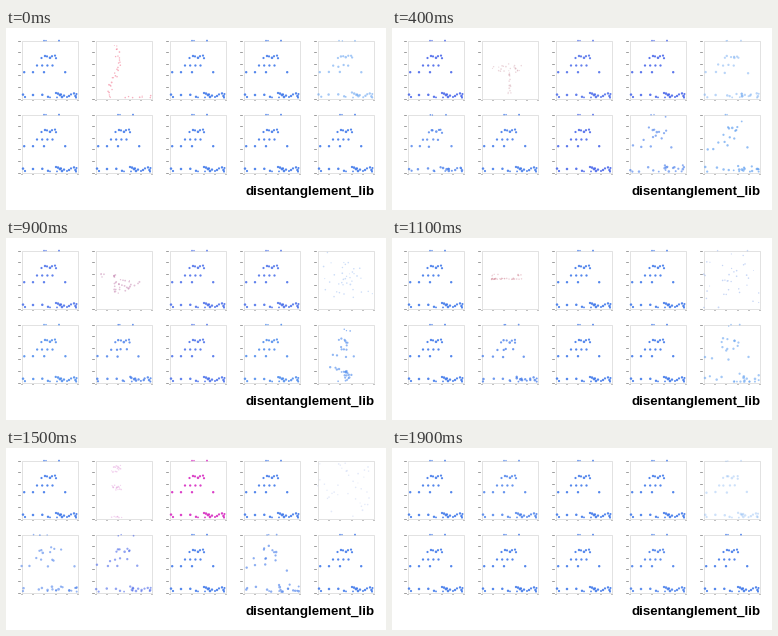
Recreate the animation shown at these times as a matplotlib script. Size 380 px wide and 182 px high, loop 2 s.

```python
import numpy as np
import matplotlib.pyplot as plt
from matplotlib.animation import FuncAnimation
from matplotlib.colors import to_rgb
from matplotlib.patches import Rectangle

W, H, DPI = 380, 182, 100
PX = 72 / DPI
FRAMES, STEP = 20, 100
PW, PH, PITCH = 56, 58, 74
BLUE, INDIGO, PALE = "#4079ea", "#4a68ea", "#5a9cf0"

# Dots of one panel: (x, y, diameter), grouped by band
TOP = [(23, 0.6, 1.6), (25, 0.6, 1.4), (38, 0.6, 1.8)]
ARC = [(20.5, 18, 2.2), (24, 16, 2.4), (26, 16.4, 2.2), (29, 17.8, 2.6),
       (31, 16.2, 2.2), (34, 15.6, 2.2), (35, 18.2, 2.2)]
MID = [(x, 25.5, 2.3) for x in (16, 21.2, 26.4, 31.5)]
LOW = [(x, 32.2, 2.4) for x in (3.2, 12, 23, 44.2)]
FLOOR = [(2, 54.6, 2.5), (4, 57, 2.2), (12, 55, 2.5), (21.3, 54.8, 2.5),
         (27, 56.8, 2.4), (29, 57.4, 1.8), (35, 53, 2.3), (37, 53.6, 2.6),
         (39, 55, 2.8), (41, 57, 2.6), (40, 54.4, 2.2), (43, 55.6, 2.4),
         (48, 56, 2.4), (50, 54.4, 2.2), (53, 53.4, 2.4), (54.5, 56, 2.6),
         (55.5, 54, 2), (46, 57, 2), (55, 57.6, 2), (36, 57.4, 1.8)]
DOTS = np.array(TOP + ARC + MID + LOW + FLOOR)
BASE, DIAM = DOTS[:, :2], DOTS[:, 2]
N = len(DOTS)


def layout(kind, rng):
    """Dot positions, relative to the panel's corner."""
    u, v = rng.random(N), rng.random(N)
    t = np.linspace(0, 1, N)
    side = np.arange(N) % 5
    if kind == "noise":
        return np.c_[u * PW, v * PH]
    if kind == "streak":
        x = 17 + 5 * np.sin(5 * t) + 4 * v
        y = 5 + 53 * t
        x = np.where(side == 0, u * PW, x)
        return np.c_[x, np.where(side == 0, 57, y)]
    if kind == "cross":
        x = np.where(side < 2, 28 + v, 10 + 32 * u)
        y = np.where(side < 2, 30 + 25 * t, 24 + 9 * v)
        return np.c_[x, y]
    if kind == "column":
        x = np.where(side == 0, 1, np.where(side == 1, 55.5, 28))
        y = np.where(side == 0, 22 + 8 * t,
                     np.where(side == 1, 32 + 18 * t, 29 + 28 * t))
        return np.c_[x, y]
    if kind == "row":
        return np.c_[9 + 33 * u ** 1.3, 29 + 0.8 * (v - 0.5) - 4 * (side == 0)]
    if kind == "sparse":
        x = 16 + 9 * t + 2 * v
        y = np.where(side < 2, 6 + 8 * u, np.where(side < 4, 25 + 5 * v, 57))
        return np.c_[x, y]
    if kind == "curve":
        y = 10 + 47 * t
        x = np.where(t < 0.5, 29 - 6 * t, 26 - 38 * (t - 0.5))
        return np.c_[x + 9 * (v - 0.4), y]
    if kind == "rise":
        return np.c_[4 + 50 * u, 50 - 42 * u + 16 * (v - 0.5)]
    return BASE.copy()


# Keys: frame, layout, colour, opacity, spread in x, spread in y
STILL = [(0, "base", BLUE, .9, 0, 0), (4, "base", INDIGO, .9, 0, 0),
         (8, "base", INDIGO, .85, 0, 0), (11, "base", BLUE, .9, 0, 0),
         (19, "base", BLUE, .9, 0, 0)]
KEYS = [
    STILL,
    [(0, "streak", "#f0607f", .5, 1, 1), (4, "cross", "#c88a98", .35, 1, 1),
     (7, "column", "#a865b8", .5, .2, .2), (11, "row", "#cf7f90", .38, .5, .3),
     (15, "sparse", "#d873cc", .32, .5, .5),
     (17, "base", "#a58bd0", .5, .3, .3), (19, "base", BLUE, .8, 0, 0)],
    [(0, "base", BLUE, .9, 0, 0), (7, "base", "#5562ea", .85, 0, 0),
     (11, "base", BLUE, .9, 0, 0), (13, "base", BLUE, .9, 0, 0),
     (15, "base", "#d936c4", .95, 0, 0), (17, "base", "#6d68dc", .85, 0, 0),
     (19, "base", BLUE, .9, 0, 0)],
    STILL,
    [(0, "base", PALE, .55, .3, .3), (4, "base", PALE, .42, 1.2, .6),
     (7, "noise", PALE, .28, 0, 0), (11, "noise", "#6690e8", .36, 0, 0),
     (15, "noise", "#8fa8e8", .25, 0, 0), (17, "rise", PALE, .3, 0, 0),
     (19, "base", PALE, .3, .4, .3)],
    [(0, "base", BLUE, .9, 0, 0), (4, "base", BLUE, .75, .8, .3),
     (7, "base", PALE, .85, .2, .1), (11, "base", BLUE, .9, 0, 0),
     (13, "base", BLUE, .9, 0, 0), (15, "base", BLUE, .55, 6, .8),
     (17, "base", BLUE, .7, 1, .4), (19, "base", BLUE, .9, 0, 0)],
    [(0, "base", BLUE, .9, 0, 0), (7, "base", BLUE, .85, .1, .1),
     (11, "base", BLUE, .75, .8, .4), (15, "base", INDIGO, .6, 1.2, .7),
     (17, "base", BLUE, .85, .3, .1), (19, "base", BLUE, .9, 0, 0)],
    STILL,
    [(0, "base", BLUE, .9, 0, 0), (4, "base", BLUE, .6, 1.4, 2),
     (7, "base", PALE, .85, .3, .2), (11, "base", BLUE, .9, 0, 0),
     (13, "base", BLUE, .9, 0, 0), (15, "base", BLUE, .6, 3, 2.4),
     (17, "base", PALE, .7, .6, .5), (19, "base", BLUE, .85, 0, 0)],
    [(0, "base", BLUE, .9, 0, 0), (4, "base", PALE, .65, 1.2, 2.2),
     (7, "curve", BLUE, .7, .4, .4), (11, "base", PALE, .55, 2.4, 2),
     (15, "base", BLUE, .9, 0, 0), (19, "base", BLUE, .9, 0, 0)],
]


def build(panel):
    """Turn a panel's keys into arrays of position, colour and opacity."""
    built = []
    for frame, kind, color, alpha, jx, jy in KEYS[panel]:
        rng = np.random.default_rng(100 * panel + frame)
        pos = layout(kind, rng) + rng.normal(size=(N, 2)) * (jx, jy)
        pos = np.clip(pos, 0.6, (PW - 0.3, PH - 0.4))
        scale = {"base": 1, "curve": .9, "column": .85}.get(kind, .65)
        built.append((frame, pos, np.array(to_rgb(color)), alpha, scale))
    return built


TRACKS = [build(p) for p in range(10)]
CORNERS = [(15 + PITCH * (p % 5), 12 + PITCH * (p // 5)) for p in range(10)]


def state(track, i):
    for a, b in zip(track, track[1:]):
        if i <= b[0]:
            k = (i - a[0]) / (b[0] - a[0])
            return [x + (y - x) * k for x, y in zip(a[1:], b[1:])]


fig = plt.figure(figsize=(W / DPI, H / DPI), dpi=DPI, facecolor="white")
ax = fig.add_axes([0, 0, 1, 1])
ax.set(xlim=(0, W), ylim=(H, 0))
ax.axis("off")

for x, y in CORNERS:
    ax.add_patch(Rectangle((x + .5, y + .5), PW, PH, fill=False, ec="#cfcfcf",
                           lw=.6 * PX))
    for k in range(6):
        ty = y + .5 + k * PH / 5
        ax.plot([x - 2.6, x - 1.2], [ty, ty], color="#777777", lw=.7 * PX)
        tx = x + .5 + k * PW / 5
        ax.plot([tx - .5, tx + .5], [y + PH + 2] * 2, color="#999999",
                lw=.7 * PX)

ax.text(239.4, 167.5, "disentanglement_lib", family="Liberation Sans",
        weight="bold", size=13.45 * PX, color="black", va="baseline")

dots = ax.scatter(np.zeros(10 * N), np.zeros(10 * N), s=1, linewidths=0,
                  zorder=3)


def draw(i):
    pos, colors, sizes = [], [], []
    for corner, track in zip(CORNERS, TRACKS):
        p, rgb, alpha, scale = state(track, i)
        pos.append(p + corner)
        colors.append(np.tile([*rgb, alpha], (N, 1)))
        sizes.append((DIAM * scale * PX) ** 2)
    dots.set_offsets(np.vstack(pos))
    dots.set_facecolors(np.vstack(colors))
    dots.set_sizes(np.concatenate(sizes))
    return dots,


anim = FuncAnimation(fig, draw, frames=FRAMES, interval=STEP, repeat=True,
                     repeat_delay=0, init_func=lambda: draw(0))
plt.show()
```
